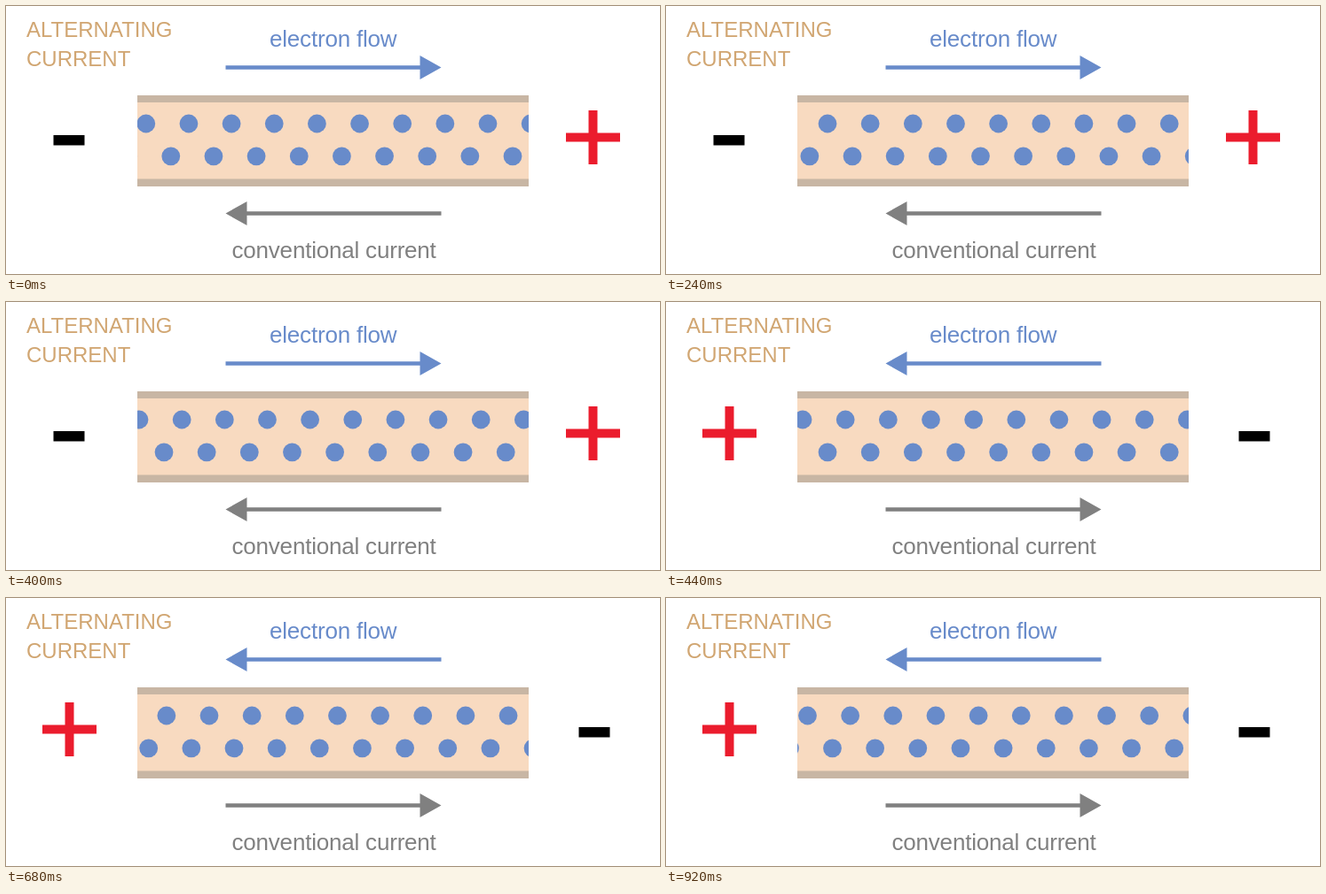
These frames come from a looping animation (737 by 303 pixels, 960 ms). An HTML page:

```html
<!DOCTYPE html>
<html lang="en">
<head>
<meta charset="utf-8">
<title>Alternating current</title>
<style>
  html, body { margin: 0; width: 100%; height: 100%; overflow: hidden; background: #fff; }
  svg { display: block; font-family: "Liberation Sans", Arial, sans-serif; }
  .title { font-size: 24px; fill: #d1a672; }
  .label { font-size: 26px; letter-spacing: -.2px; }
</style>
</head>
<body>
<svg width="737" height="303" viewBox="0 0 737 303">
  <defs>
    <path id="arrow" d="M-121.5-2.2H97.5V-13.5L121.5 0L97.5 13.5V2.2H-121.5Z"/>
    <clipPath id="wire"><rect x="148" y="101" width="441" height="103"/></clipPath>
  </defs>

  <g class="title">
    <text x="23" y="35">ALTERNATING</text>
    <text x="23" y="68">CURRENT</text>
  </g>
  <text class="label" x="297" y="46" fill="#688bca">electron flow</text>
  <text class="label" x="254.5" y="285" fill="#808080">conventional current</text>

  <rect x="148" y="101" width="441" height="103" fill="#c8b6a4"/>
  <rect x="148" y="109" width="441" height="86.5" fill="#f8dac0"/>
  <g clip-path="url(#wire)"><g id="electrons" fill="#688bca"></g></g>

  <use id="flow" href="#arrow" fill="#688bca"/>
  <use id="current" href="#arrow" fill="#808080"/>
  <path id="minus" d="M-17.5-6h35v11.5h-35Z"/>
  <path id="plus" d="M-30.5 0H30.5M0-30.5V30.5" stroke="#eb1c2d" stroke-width="10"/>
</svg>
<script>
  const STEP = 40, STEPS = 24, TURN = 11, LAST = 23;
  const SPACING = 48.15, START = 157.8, FAR = 202.2, END = 159.5;
  const $ = id => document.getElementById(id);
  const lerp = (a, b, t) => a + (b - a) * t;
  const place = (id, x, y, flip = 1) =>
    $(id).setAttribute('transform', `translate(${x} ${y}) scale(${flip} 1)`);

  const addRow = (x, y) => {
    for (let i = -2; i < 10; i++) {
      $('electrons').innerHTML += `<circle cx="${x + i * SPACING}" cy="${y}" r="10.4"/>`;
    }
  };
  addRow(0, 133);
  addRow(28, 169.8);

  function draw(now) {
    const step = Math.floor(now / STEP) % STEPS;
    const forward = step < TURN;
    const x = forward
      ? lerp(START, FAR, step / TURN)
      : lerp(FAR, END, (step - TURN) / (LAST - TURN));
    place('electrons', x, 0);
    place('flow', 369, 69.5, forward ? 1 : -1);
    place('current', 369, 234.5, forward ? -1 : 1);
    place('minus', forward ? 71 : 663, 152);
    place('plus', forward ? 661.5 : 71.5, 148.5);
  }

  const loop = () => {
    draw(performance.now());
    requestAnimationFrame(loop);
  };
  loop();
</script>
</body>
</html>
```
